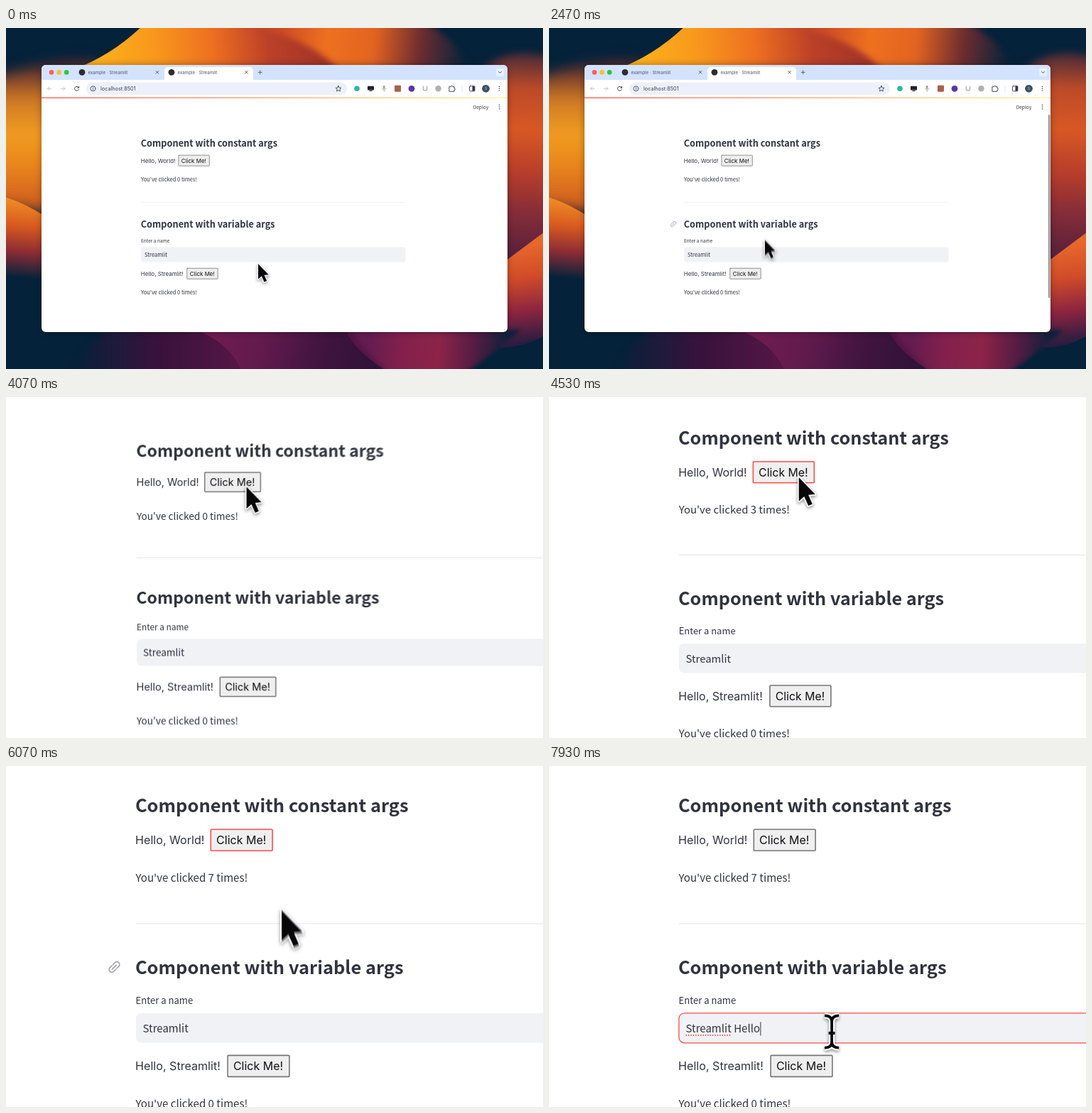
Recreate the animation shown at these times as an HTML page with a canvas. Size 756 by 480 pixels, loop 8000 ms.

```html
<!DOCTYPE html>
<html lang="en">
<head>
<meta charset="utf-8">
<title>Component demo</title>
<style>
html, body { margin: 0; width: 100%; height: 100%; overflow: hidden; background: #04223a; }
canvas { display: block; }
</style>
</head>
<body>
<canvas id="stage" width="756" height="480"></canvas>
<script>
const W = 756, H = 480, LOOP = 8000, SHUTTER = 14;
const SOURCE = '"Noto Sans CJK JP", "Noto Sans CJK SC", "Noto Sans CJK", "Noto Sans", sans-serif';
const SYSTEM = 'Inter, "Liberation Sans", sans-serif';
const INK = '#31333f', PAPER = '#ffffff', FIELD = '#f0f2f6', ACCENT = '#ff4b4b', MUTED = '#9c9ca6';

const newCanvas = () => Object.assign(document.createElement('canvas'), { width: W, height: H });
const out = document.getElementById('stage').getContext('2d');
const buffer = newCanvas();
const g = buffer.getContext('2d');

const clamp = v => Math.max(0, Math.min(1, v));

// ---------- timeline ----------
const CLICKS = Array.from({ length: 7 }, (_, i) => 4080 + 220 * i);
const FOCUS = 6900;
const PATH = [
  [0, 355, 332], [850, 355, 332], [1470, 308, 460], [1760, 306, 488], [2050, 305, 455],
  [2470, 304, 299], [2900, 285, 225], [3730, 265, 197], [4020, 275.4, 190.3],
  [5680, 275.4, 190.3], [6070, 292.8, 236], [6380, 297.8, 321.5], [LOOP, 297.8, 321.5]
];

// Monotone cubic interpolation along one coordinate of PATH.
function along(t, axis) {
  const slope = i => i < 0 || i > PATH.length - 2 ? 0 :
    (PATH[i + 1][axis] - PATH[i][axis]) / (PATH[i + 1][0] - PATH[i][0]);
  const tangent = i => {
    const a = slope(i - 1), b = slope(i);
    return a * b <= 0 ? 0 : 2 * a * b / (a + b);
  };
  let i = 0;
  while (i < PATH.length - 2 && t >= PATH[i + 1][0]) i++;
  const d = PATH[i + 1][0] - PATH[i][0], u = clamp((t - PATH[i][0]) / d), v = 1 - u;
  return (1 + 2 * u) * v * v * PATH[i][axis] + u * v * v * d * tangent(i) +
    u * u * (3 - 2 * u) * PATH[i + 1][axis] - u * u * v * d * tangent(i + 1);
}

function zoomAt(t) {
  const x = 0.006 * Math.max(0, t - 3559);
  return 1 - (1 + x) * Math.exp(-x);
}

function stateAt(t) {
  const typed = Math.max(0, Math.floor((t - 7000) / 150));
  return {
    zoom: zoomAt(t),
    x: along(t, 1), y: along(t, 2),
    press: Math.max(...[...CLICKS, FOCUS].map(c => Math.exp(-(((t - c) / 60) ** 2)))),
    count: CLICKS.filter(c => t >= c).length,
    focused: t >= FOCUS,
    typed,
    value: 'Streamlit' + ' Hello'.slice(0, typed),
    link: (t > 2400 && t < 2700) || (t > 6000 && t < 6280),
    scrollbar: clamp((t - 2150) / 150) * clamp((3150 - t) / 250)
  };
}

// ---------- drawing helpers ----------
function rect(x, y, w, h, fill, radius = 0, stroke, lineWidth = 0.6) {
  g.beginPath();
  g.roundRect(x, y, w, h, radius);
  if (fill) { g.fillStyle = fill; g.fill(); }
  if (stroke) { g.strokeStyle = stroke; g.lineWidth = lineWidth; g.stroke(); }
}
function dot(x, y, r, fill) {
  g.beginPath();
  g.arc(x, y, r, 0, 7);
  g.fillStyle = fill;
  g.fill();
}
function line(d, color = INK, width = 0.9) {
  g.strokeStyle = color;
  g.lineWidth = width;
  g.lineCap = g.lineJoin = 'round';
  g.stroke(new Path2D(d));
}
function text(str, x, y, size, family = SOURCE, color = INK, weight = 400) {
  g.font = `${weight} ${size}px ${family}`;
  g.fillStyle = color;
  g.fillText(str, x, y);
}
function menuDots(x, y) {
  for (const dy of [-2.8, 0, 2.8]) dot(x, y + dy, 0.75, INK);
}

// ---------- wallpaper ----------
function paintWallpaper() {
  const canvas = newCanvas(), c = canvas.getContext('2d');
  const petal = (d, [x0, y0, x1, y1], colors, blur = 0) => {
    const fill = c.createLinearGradient(x0, y0, x1, y1);
    colors.forEach((color, i) => fill.addColorStop(i / (colors.length - 1), color));
    c.filter = blur ? `blur(${blur}px)` : 'none';
    c.fillStyle = fill;
    c.fill(new Path2D(d));
  };
  c.fillStyle = '#04223a';
  c.fillRect(0, 0, W, H);
  // left
  petal('M-40 82 Q40 42 130 48 L200 280 L-40 245Z', [0, 55, 0, 245],
    ['#5a2c30', '#d07a24', '#f09c20', '#e8821c', '#d0601e'], 9);
  petal('M-5 237 Q25 245 60 268 V380 L-5 352Z', [10, 240, 0, 350],
    ['#f08c24', '#d85a20', '#8c2c34', '#04223a']);
  // top
  petal('M96 58 Q150 38 194 -5 H480 V60Z', [130, 50, 450, 20],
    ['#fcb01c', '#f8981c', '#ee7020', '#bc4028', '#a03428']);
  petal('M300 -10 Q420 5 470 60 H655 Q640 20 585 -10Z', [320, 0, 650, 30],
    ['#b83c26', '#cc4a24', '#ee7020', '#e26420', '#6c2c30', '#04223a'], 4);
  // right
  petal('M670 60 Q715 20 775 45 V335 H690Z', [730, 25, 715, 320],
    ['#30243c', '#bc4a28', '#d85824', '#b83e2a', '#842c38', '#58203c'], 6);
  petal('M695 334 Q730 308 770 278 V425 Q735 450 695 450Z', [720, 305, 740, 445],
    ['#e8682c', '#d04c28', '#8c2440', '#241c40']);
  // bottom
  petal('M90 495 Q115 440 150 420 H560 V495Z', [100, 450, 560, 450],
    ['#08203a', '#38123c', '#561646', '#4c1444', '#5c1a4c'], 5);
  petal('M268 425 Q318 445 332 485 H540 Q490 455 478 425Z', [290, 430, 520, 475],
    ['#701c50', '#601a4c', '#401440', '#301238']);
  petal('M485 425 H725 Q690 455 640 490 H545 Q505 455 485 425Z', [510, 440, 710, 455],
    ['#641c50', '#84204c', '#8c2448', '#541c44', '#08203a'], 3);
  return canvas;
}
const wallpaper = paintWallpaper();

// ---------- browser ----------
function drawTab(x, closeX) {
  dot(x, 62.3, 4.4, '#2c2c34');
  text('example · Streamlit', x + 8.5, 64.6, 6.2, SYSTEM, '#505464');
  line(`M${closeX - 1.8} 60.5l3.6 3.6m0-3.6l-3.6 3.6`, INK, 0.8);
}

function drawBrowser() {
  g.save();
  g.shadowColor = 'rgba(0,0,0,.35)';
  g.shadowBlur = 10;
  rect(50, 52, 656, 376, PAPER, 6);
  g.restore();
  rect(50, 52, 656, 21, '#d3e3fd', [6, 6, 0, 0]);
  rect(223, 55, 125, 18, PAPER, [5, 5, 0, 0]);
  ['#ff5f57', '#febc2e', '#28c840'].forEach((c, i) => dot(64 + 10.6 * i, 62.4, 3.3, c));
  drawTab(107, 213);
  drawTab(233, 338.5);
  line('M355.2 62.4h5m-2.5-2.5v5', INK, 0.7);
  rect(690, 56.5, 11, 11.5, '#e8f0fe', 3);
  line('M693.6 61.5l1.9 1.9 1.9-1.9');

  line('M64 85.3h-5.4m2.4-2.4l-2.4 2.4 2.4 2.4M77.5 85.3h5.4m-2.4-2.4l2.4 2.4-2.4 2.4', '#b4b6be', 0.8);
  line('M102.3 84a3 3 0 1 0 .1 2.4M102.6 82.2v2h-2');
  rect(113, 76.5, 367, 17.5, '#edf0f8', 8.7);
  line('M126 85.3a3.5 3.5 0 1 1-7 0a3.5 3.5 0 1 1 7 0M122.5 85v2m0-3.6v.1', INK, 0.8);
  text('localhost:8501', 133, 87.9, 7.3, SYSTEM, '#40424c');
  line('M468 81.4l1.2 2.6 2.8.3-2.1 1.9.6 2.8-2.5-1.4-2.5 1.4.6-2.8-2.1-1.9 2.8-.3z', INK, 0.8);

  dot(494, 85.3, 3.8, '#28b8a0');
  rect(509, 81.8, 9, 5.6, '#222228', 1);
  rect(511.5, 88, 4, 1, '#222228');
  rect(530.9, 81, 2.6, 5, '#98a498', 1.3);
  line('M529.3 85q3 5 6 0m-3 2.5v2', '#98a498', 0.8);
  rect(547, 80.8, 9, 9, '#a8604c', 1);
  dot(571, 85.3, 4.4, '#5a34a8');
  line('M587.3 82v3.5a2.7 2.7 0 0 0 5.4 0V82', '#a8a8b0', 1.2);
  dot(608.5, 85.3, 4.2, '#b0b0b4');
  line('M624.3 82.7h2.2a1.2 1.2 0 0 1 2.4 0h2.2v2.2a1.2 1.2 0 0 1 0 2.4v2h-6.8z', INK, 0.9);
  rect(641.7, 81, 0.8, 9, '#d3e3fd');
  rect(652.5, 81.7, 7.4, 7.2, null, 1, INK, 0.9);
  rect(656.5, 82, 3.4, 6.6, INK);
  dot(675.5, 85.3, 5.4, '#3c5064');
  text('S', 674, 87.1, 4.8, SYSTEM, '#d8e0ec');
  menuDots(694.5, 85.3);

  const bar = g.createLinearGradient(50, 0, 706, 0);
  bar.addColorStop(0, '#ff6a5c');
  bar.addColorStop(1, '#fff6a0');
  rect(50, 97.5, 656, 1.6, bar);
}

// ---------- page ----------
function drawGreeting(name, buttonX, top, count, active) {
  text(`Hello, ${name}!`, 189.8, top + 10.5, 8.06, SYSTEM);
  rect(buttonX, top, 43.4, 15, '#efefef', 0.5, active ? ACCENT : '#767676', 0.8);
  text('Click Me!', buttonX + 3.9, top + 10.5, 8, SYSTEM, '#101014');
  text(`You've clicked ${count} times!`, 190, top + 36.8, 7.54);
}

function drawPage(s) {
  text('Deploy', 657.7, 113.5, 6.55);
  menuDots(694.5, 111);

  text('Component with constant args', 189.7, 167, 12.74, SOURCE, INK, 700);
  drawGreeting('World', 242.9, 179.1, s.count, s.count > 0 && !s.focused);
  rect(190, 245.2, 372.5, 0.5, '#e4e5ea');

  text('Component with variable args', 189.7, 281.2, 12.74, SOURCE, INK, 700);
  if (s.link) {
    g.save();
    g.translate(175, 276);
    g.rotate(-Math.PI / 4);
    line('M-.5-1.9h-2a1.9 1.9 0 0 0 0 3.8h2M.5-1.9h2a1.9 1.9 0 0 1 0 3.8h-2M-1.9 0h3.8', MUTED, 0.8);
    g.restore();
  }
  text('Enter a name', 190, 301.8, 6.55);
  rect(190.2, 308.4, 372.3, 21, FIELD, 4, s.focused && ACCENT, 0.65);
  text(s.value, 195, 321.8, 7.5);
  if (s.focused) {
    rect(195 + g.measureText(s.value).width + 0.2, 314.6, 0.5, 9.6, INK);
    if (s.typed) {
      const end = 195 + g.measureText('Streamlit').width;
      for (let x = 195.4; x < end; x += 1.7) dot(x, 324, 0.45, ACCENT);
    }
  }
  drawGreeting('Streamlit', 254.8, 338.2, 0, false);

  if (s.scrollbar) {
    g.globalAlpha = s.scrollbar;
    rect(702.8, 122, 2.6, 258, '#9a9aa0', 1.3);
    g.globalAlpha = 1;
  }
}

// ---------- pointer ----------
const ARROW = new Path2D('M0 0V21.6L4.8 17.2L8.6 25.6L12.2 24.1L8.6 15.8L14.8 15.3Z');
const IBEAM = new Path2D('M-5-11.3Q0-11.3 0-7Q0-11.3 5-11.3M0-7.5V7.5M-5 11.3Q0 11.3 0 7Q0 11.3 5 11.3M-2.2 1H2.2');

function drawPointer(s) {
  const overField = s.y > 308.5 && s.y < 329.5;
  const shape = overField ? IBEAM : ARROW;
  const size = 1 - 0.22 * s.press;
  g.save();
  g.translate(s.x, s.y);
  g.scale(size, size);
  g.lineJoin = 'round';
  g.lineCap = 'butt';
  g.save();
  g.shadowColor = 'rgba(0,0,0,.45)';
  g.shadowBlur = 4;
  g.shadowOffsetY = 2;
  g.strokeStyle = '#ffffff';
  g.lineWidth = overField ? 4 : 2.2;
  g.stroke(shape);
  g.restore();
  if (overField) {
    g.strokeStyle = '#08080a';
    g.lineWidth = 1.9;
    g.stroke(shape);
  } else {
    g.fillStyle = '#08080a';
    g.fill(shape);
  }
  g.restore();
}

function drawScene(s) {
  const k = 1 + s.zoom;
  g.setTransform(k, 0, 0, k, -197.5 * s.zoom, -269 * s.zoom);
  g.drawImage(wallpaper, 0, 0);
  drawBrowser();
  drawPage(s);
  drawPointer(s);
}

// Averages several instants within the shutter while something moves.
function render(t) {
  const now = stateAt(t), before = stateAt(Math.max(0, t - SHUTTER));
  const travel = Math.hypot(now.x - before.x, now.y - before.y) + 400 * (now.zoom - before.zoom);
  const samples = travel > 0.4 ? 6 : 1;
  for (let i = 0; i < samples; i++) {
    const u = samples > 1 ? i / (samples - 1) - 0.5 : 0;
    const at = stateAt(t + u * SHUTTER);
    drawScene({ ...now, x: at.x, y: at.y, zoom: at.zoom });
    out.globalAlpha = 1 / (i + 1);
    out.drawImage(buffer, 0, 0);
  }
}

const start = performance.now();
function tick() {
  render((performance.now() - start) % LOOP);
  requestAnimationFrame(tick);
}
tick();
</script>
</body>
</html>
```
